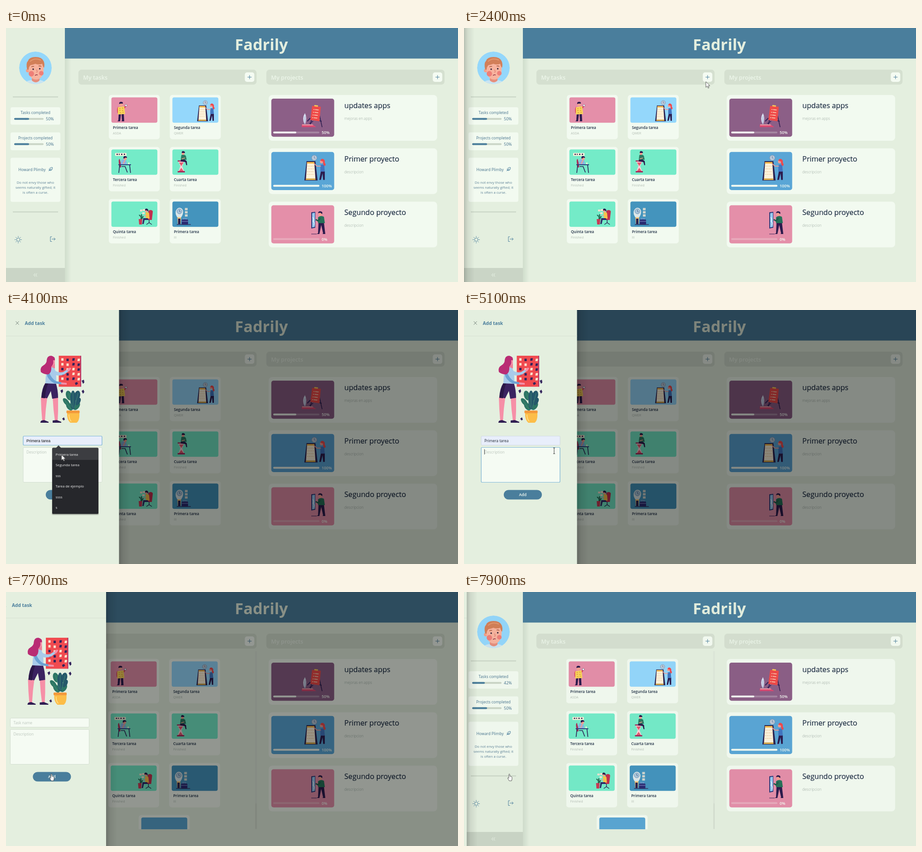
An HTML page that plays this animation: 998 px wide and 561 px high, repeating every 8000 ms.

```html
<!DOCTYPE html>
<html lang="es">
<head>
<meta charset="utf-8">
<title>Task board</title>
<style>
html,body{margin:0;width:100%;height:100%;overflow:hidden;background:#e4efdf}
svg{display:block;width:100vw;height:100vh}
text{font-family:"Open Sans","Noto Sans",sans-serif;white-space:pre}
.mid{text-anchor:middle}
.brand{font-size:34.3px;font-weight:700;fill:#e4efdf}
.bar{font-size:12.7px;font-weight:600;fill:#edf6ea}
.name{font-size:8.4px;font-weight:600;fill:#1f2f45}
.sub{font-size:7.2px;fill:#b3bdb3}
.big{font-size:16.15px;font-weight:500;fill:#1f2f45;stroke:#1f2f45;stroke-width:.2}
.note{font-size:8.2px;font-weight:300;fill:#98a59c}
.pct{font-size:8.7px;font-weight:600;fill:#f4fbf2}
.side{font-size:8.5px;font-weight:500;fill:#44718c}
.num{font-size:9px;font-weight:500;fill:#44718c}
.quote{font-size:7.7px;fill:#5d8196}
.head{font-size:10.2px;font-weight:700;fill:#4a7e9c}
.hint{font-size:8.4px;fill:#bcc6bd}
.value{font-size:8.4px;fill:#1c2430}
.pre{font:8.75px "Liberation Sans",Arial,sans-serif;fill:#111}
.menu{font-size:7.8px;fill:#f2f2f2}
.thin{fill:none;stroke:#4a7e9c;stroke-width:1}
.field{fill:#f5fbf3;stroke:#d3ddd0;stroke-width:1}
.focus{fill:none;stroke:#7fb8da;stroke-width:1.2}
#drawer,#mask,#list,.cur{animation:8s linear infinite}
#drawer{animation-name:slide}
#mask{animation-name:dim}
#list{animation-name:nudge;animation-timing-function:step-end}
#arrow{animation-name:arrow}
#beam{animation-name:beam}
#hand{animation-name:hand}
@keyframes slide{
 0%{transform:translateX(-250px);animation-timing-function:step-end}
 31.1%{transform:none;animation-timing-function:step-end}
 95.41%{transform:none;animation-timing-function:cubic-bezier(.7,.3,.1,1)}
 99.9%,100%{transform:translateX(-250px)}}
@keyframes dim{
 0%{opacity:0;animation-timing-function:step-end}
 31.1%{opacity:1;animation-timing-function:step-end}
 95.41%{opacity:1;animation-timing-function:cubic-bezier(.7,.3,.1,1)}
 99.9%,100%{opacity:0}}
@keyframes nudge{0%{transform:none}94.85%,100%{transform:translateX(-1.5px)}}
@keyframes arrow{
 0%,26%{transform:translate(560px,190px)}
 29%,30.2%{transform:translate(534px,118.5px)}
 31.1%,31.4%{transform:translate(473px,170px)}
 35.6%{transform:translate(200px,310px)}
 35.7%,48.7%{transform:translate(136px,300px)}
 51%,100%{transform:translate(122.5px,319.5px)}}
@keyframes beam{
 0%,35.6%{transform:translate(200px,312px)}
 36.2%{transform:translate(170px,337px)}
 38.7%,53.6%{transform:translate(138px,296px)}
 53.7%{transform:translate(125px,325px)}
 58.7%,100%{transform:translate(199px,311px)}}
@keyframes hand{
 0%,88.7%{transform:translate(148px,398px)}
 91.2%{transform:translate(104px,398px)}
 93.7%,100%{transform:translate(96px,402px)}}
</style>
</head>
<body>
<svg viewBox="0 0 998 561" preserveAspectRatio="none">
<defs>
<linearGradient id="edge"><stop stop-color="#000" stop-opacity=".2"/><stop offset=".35" stop-color="#000" stop-opacity=".08"/><stop offset="1" stop-color="#000" stop-opacity="0"/></linearGradient>
<linearGradient id="soft"><stop stop-color="#4a6a50" stop-opacity=".13"/><stop offset="1" stop-color="#4a6a50" stop-opacity="0"/></linearGradient>
<clipPath id="face"><circle cx="65" cy="88" r="36"/></clipPath>
<clipPath id="view"><rect x="160" y="131" width="394" height="392.5"/></clipPath>

<g id="planner">
 <path d="M249 188l-1 16-2 2h6l2-18zM255 188l1 16-1 2h6l-1-18z" fill="#2c1b4d"/>
 <path d="M247 174q-3 5-1 14l3 0v-13zM262 178l5-7-2-1-5 5z" fill="#d9435f"/>
 <path d="M247 175l14-2 2 17-16 1z" fill="#fad35b"/>
 <path d="M250 178l3 0M256 177l3 0M250 182h3M256 182h3M251 187h3M257 186h3" stroke="#d89a3c" stroke-width="1.4"/>
 <circle cx="254" cy="169" r="4" fill="#f5a08f"/>
 <path d="M250 168q-1-5 4-5 5 0 4 4l-5 0z" fill="#2c1b4d"/>
 <circle cx="265" cy="171" r="2.2" fill="#fff" stroke="#4a3b60" stroke-width=".6"/>
</g>

<g id="chart">
 <circle cx="440" cy="165" r="4.8" fill="#b9c9da" stroke="#7f93ad" stroke-width=".8"/>
 <path d="M440 162v3l2 1" fill="none" stroke="#44507a" stroke-width=".6"/>
 <path d="M426 171h16l4 35h-24z" fill="#2c2350"/>
 <path d="M427 172.500h13l2 30h-17z" fill="#fdf3dc"/>
 <path d="M427 172.500h13l.3 3h-13.600z" fill="#f6b94a"/>
 <path d="M428 180h11M428 185h11.500M427 190h13M427 195h13" stroke="#e3b98a" stroke-width="1" stroke-dasharray="1.6 1.6"/>
 <path d="M425 202.500h17l.3 2.500h-18z" fill="#f3c04c"/>
 <path d="M452 189l-3 16h3l3-12 1 12h3l0-16z" fill="#2c1b4d"/>
 <path d="M451 178q4-2 7 0l1 12h-8z" fill="#4276c1"/>
 <path d="M452 180l-7 0-6-5" fill="none" stroke="#f59d92" stroke-width="1.5"/>
 <circle cx="453" cy="172" r="2.800" fill="#f59d92"/>
 <path d="M451 170q1-4 5-3 4 2 3 7 3 3 0 6-4-2-3-8z" fill="#f04a4d"/>
</g>

<g id="desk">
 <rect x="241" y="276" width="25" height="6.500" rx="1" fill="#f7f2da"/>
 <path d="M244 279h3M249 279h2M254 279h3M260 279h3" stroke="#2c1b4d" stroke-width="2.300"/>
 <path d="M249 297q-1-7 2-8l3 12v7h-4z" fill="#a83058"/>
 <path d="M255 291q7-4 11 3l1 8h-14z" fill="#8ab5e3"/>
 <path d="M259 300l4-9" stroke="#f5a08f" stroke-width="2"/>
 <circle cx="263" cy="288" r="3.500" fill="#f5a08f"/>
 <path d="M259 288q0-6 5-5 4 1 3 4-4-2-5 1z" fill="#2c1b4d"/>
 <path d="M248 301h28v2h-28z" fill="#2d3f7c"/>
 <path d="M251 303l-2 17M273 303l2 17M255 306h8l5 13" fill="none" stroke="#2d2658" stroke-width="1.700"/>
 <rect x="270" y="297" width="2.500" height="4" fill="#f7f2da"/>
</g>

<g id="glass">
 <path d="M380 294h14l-5 11 4 11h-12l4-11z" fill="#f7d3d8"/>
 <path d="M382 297h10l-5 8zM387 309l5 7h-10z" fill="#e45a70"/>
 <path d="M379 292.500h16v2.500h-16zM379 316h16v3h-16z" fill="#a32c5c"/>
 <path d="M386 291h9l4 3 1 9h-2l-2-7-10-1z" fill="#2c1b4d"/>
 <path d="M387 281q5-3 10 1l2 9h-13z" fill="#2c7a62"/>
 <path d="M395 287l-7 2" stroke="#f5a08f" stroke-width="1.500"/>
 <circle cx="391" cy="277" r="3.200" fill="#f5a08f"/>
 <path d="M388 276q0-5 4-4 4 1 3 4z" fill="#2c1b4d"/>
</g>

<g id="chair">
 <path d="M296 401h5v4h-5zM302 400h5v4h-5zM301 407h5v4h-5z" fill="#f8e3d0"/>
 <path d="M297 417q-5-3-3-5 3 1 4 4-1-5 2-5 1 2 0 7 2-4 4-2-1 3-3 6h-4z" fill="#246d55"/>
 <path d="M293 422h8l-1 12h-6z" fill="#c93a55"/>
 <path d="M314 405q1-3 6-3 5 1 4 5l-2 17h-11v-3h5z" fill="#c2304e"/>
 <path d="M316 424v7M310 434l6-4 6 4" fill="none" stroke="#2c1b4d" stroke-width="1.400"/>
 <path d="M308 408q4-3 8 1l1 12h-8z" fill="#f7c34a"/>
 <path d="M313 420h-10l-2 13h3l2-9h9z" fill="#2f2a68"/>
 <path d="M311 414l-7 1" stroke="#f5a08f" stroke-width="1.700"/>
 <circle cx="310" cy="404" r="3" fill="#f5a08f"/>
 <path d="M307 403q0-5 4-4 4 1 3 6l-3-2z" fill="#2c1b4d"/>
</g>

<g id="bulb">
 <path d="M378 418q-5-8-3-14 3-7 8-7 6 0 8 7 1 6-4 14z" fill="#dce8ea"/>
 <circle cx="383" cy="405" r="5.500" fill="#a9c6dc" stroke="#6e93b4"/>
 <path d="M383 401.500v3.500l2.500 1.500" fill="none" stroke="#2f3f6d" stroke-width=".8"/>
 <path d="M378.500 418h8l-1 15h-6z" fill="#f6c77c"/><path d="M380 421h5v12h-5z" fill="#2c2350"/>
 <path d="M395 397.500h6v5h-6zM395 404.500h6v5h-6zM395 411.500h6v5h-6z" fill="#cfd6d0"/>
 <rect x="388" y="423" width="14" height="11" rx="1.500" fill="#2b2c73"/>
 <path d="M392 423v-2.500h6v2.500M388 427h14" fill="none" stroke="#8a95d0" stroke-width="1.200"/>
 <path d="M377 434h31" stroke="#2c1b4d" stroke-width="1.200"/>
</g>

<g id="easel">
 <path d="M680 176l-9 43M688 174l10 45M683 203l14 3" stroke="#2c1b4d" stroke-width="1.500"/>
 <path d="M676 172l19 2-3 32-20-3z" fill="#ef4b49"/>
 <path d="M679 180l12 1M678 186l12 1M677 192l12 1M676 198l12 1" stroke="#fbd9bd" stroke-width="1.500" stroke-dasharray="2 1.400 8"/>
 <path d="M681 170l8 1-.5 3-8-1z" fill="#f9c658"/>
 <path d="M659 212q-6-13 1-24 5 9 1 24z" fill="#d7def0"/>
 <path d="M660 213v-18" stroke="#7a84b0" stroke-width=".7"/>
 <path d="M653 213h24l8 6h-32z" fill="#d84b73"/><path d="M654 213l22 0 3 2h-25z" fill="#f5a0a8"/>
 <path d="M665 206l7-7M670 211l8-5" stroke="#342158" stroke-width="2"/>
</g>

<g id="phone">
 <path d="M674 407l9-1v35l-9 2z" fill="#2e3a78"/><path d="M676 409l6-1v31l-6 1.500z" fill="#98c9ef"/>
 <path d="M677 418q4 4 1 9 5 4 2 8" fill="none" stroke="#e9f4fb" stroke-width="1.500"/>
 <path d="M690 430l-1 23-3 2h6l4-20 4 18-1 2h6l-3-25z" fill="#2c1b4d"/>
 <path d="M689 418q6-5 13-1l2 14h-15z" fill="#267158"/>
 <path d="M694 420l-5 6-5-3" fill="none" stroke="#1e5d4b" stroke-width="3"/>
 <circle cx="694" cy="411" r="4" fill="#f5a08f"/>
 <path d="M689 409q1-5 6-4 5 1 3 6l-4-3z" fill="#2c1b4d"/>
 <path d="M674 455h12" stroke="#342158"/>
</g>
</defs>

<rect width="998" height="561" fill="#e4efdf"/>
<rect x="130" y="67" width="14" height="494" fill="url(#soft)"/>
<rect x="130" width="868" height="67.500" fill="#4a7e9c"/>
<text class="brand mid" x="564" y="49">Fadrily</text>

<g clip-path="url(#face)">
 <circle cx="65" cy="88" r="36" fill="#94d7fb"/>
 <path d="M36 130q4-13 20-15h18q15 2 20 15z" fill="#c9e4f2"/>
 <path d="M57 106h17v10q-8 8-17 0z" fill="#e58f7d"/>
 <circle cx="48" cy="94" r="4" fill="#f0a08c"/>
 <path d="M49 83q2-12 17-13 17 0 17 16 1 14-4 21-5 7-12 7-9 0-14-8-4-8-4-23z" fill="#f7b39e"/>
 <path d="M47 92q-4-14 2-20 3-8 16-8 14 0 18 9 3 6 1 15-3-3-4-9-8 3-15 0-5 2-11 3-4 4-4 10z" fill="#d27f58"/>
 <path d="M53 74q10-9 24-3" fill="none" stroke="#e39a6f" stroke-width="2"/>
 <circle cx="56" cy="101" r="6" fill="#ee7f78"/><circle cx="78" cy="100" r="5" fill="#ee7f78"/>
 <circle cx="60" cy="91" r="1.700" fill="#33253a"/><circle cx="74.500" cy="90" r="1.700" fill="#33253a"/>
 <path d="M56 86q3-2 6-1M72 84q3-1 6 1" fill="none" stroke="#a75a3f" stroke-width="1.500"/>
 <path d="M67 92q4 5 0 6" fill="none" stroke="#dc7f70" stroke-width="1.300"/>
 <path d="M64 105q3-3 6-1" fill="none" stroke="#8e3444" stroke-width="1.500"/>
</g>
<path d="M15 152.300h100M15 406.300h100" stroke="#c8d3c4" stroke-width="2"/>
<g fill="#f2faf0"><rect x="10" y="175" width="110" height="38.500" rx="4"/><rect x="10" y="230.500" width="110" height="39.500" rx="4"/><rect x="10" y="286.500" width="110" height="97.500" rx="4"/></g>
<text class="side mid" x="65" y="189.500">Tasks completed</text>
<text class="side mid" x="65" y="245.500">Projects completed</text>
<g stroke-width="4" stroke-linecap="round"><path d="M20 200.700h61M20 256.500h61" stroke="#cad5c6"/><path d="M20 200.700h24M20 256.500h29" stroke="#4a7e9c"/><path d="M44 200.700h5" stroke="#4a7e9c" data-on="0-7600"/></g>
<text class="num" x="88" y="204" data-on="0-7600">50%</text>
<text class="num" x="88" y="204" data-on="7600-8000">42%</text>
<text class="num" x="88" y="260">50%</text>
<text class="side mid" x="57.500" y="315.500">Howard Plimby</text>
<path class="thin" d="M94 316l6-6M95.500 314.500q-1-4 2-5.500 2-1.500 5-1 .5 3-1 5-2 3-6 1.500zM97 313h4"/>
<g class="quote mid"><text x="65" y="344">Do not envy those who</text><text x="65" y="355">seems naturally gifted; it</text><text x="65" y="366">is often a curse.</text></g>
<g class="thin" stroke-linecap="round"><circle cx="27" cy="467.500" r="3.700"/><path d="M27 460v1.700M27 473.300v1.700M19.500 467.500h1.700M32.800 467.500h1.700M21.700 462.200l1.200 1.200M31.100 471.600l1.200 1.200M21.700 472.800l1.200-1.200M31.100 463.400l1.200-1.200"/><path d="M101 461h-3v10.500h3M101.500 466.200h7M106 463.500l2.700 2.700-2.700 2.700"/></g>
<rect y="530" width="130" height="31" fill="#cad5c6"/>
<path d="M64.500 542l-3 3.500 3 3.500M68.500 542l-3 3.500 3 3.500" fill="none" stroke="#e8f2e5" stroke-width="1.100"/>

<g id="bars"></g>
<g clip-path="url(#view)"><g id="list"></g></g>
<g data-on="7600-8000"><rect x="550.500" y="131" width="3" height="392.500" fill="#d3decf"/><rect x="550.500" y="131" width="3" height="336" rx="1" fill="#dfe9db"/></g>
<g id="projects"></g>

<rect id="mask" width="998" height="561" fill="#000" fill-opacity=".45"/>

<g id="drawer">
 <rect x="249.500" width="24" height="561" fill="url(#edge)" data-on="2400-8000"/>
 <rect width="249.500" height="561" fill="#e4efdf"/>
 <path d="M0 57.500h249.500" stroke="#d7e1d3"/>
 <path d="M21.500 25l7 7.500M28.500 25l-7 7.500" stroke="#65736c" stroke-width=".9"/>
 <text class="head" x="41.500" y="32.800">Add task</text>
 <rect x="116.500" y="101" width="48" height="68.500" fill="#f04b50"/><path d="M164.300 101h1.700v68.500h-1.700z" fill="#a92362"/>
 <g id="notes"></g>
 <path d="M77 193l14 1-3 24-2 27h-6l-2-26zM103 192l12 1 0 30-1 22h-6l-3-25z" fill="#f68fa7"/>
 <path d="M84 243l10 4v2H76q0-4 3-5zM112 243l10 4v2h-19v-5z" fill="#2f1d52"/>
 <path d="M87 161l23 0q5 16 5 33l-13 2-3-17-8 16-13-2q1-20 9-32z" fill="#3a2260"/>
 <path d="M88 161l5 1q-6 16-7 33l-8-1q2-20 10-33z" fill="#2a1746"/>
 <path d="M99 119l9-1 0 11-7 3z" fill="#ee7f98"/>
 <path d="M92 129q8-5 15 0 5 9 4 34l-24-1q0-20 5-33z" fill="#a9cbea"/>
 <path d="M104 131q11 9 22 6l13-8 2 4-12 9q-14 6-26-1z" fill="#a9cbea"/><path d="M134 133l7-6 3 2-5 7z" fill="#f68fa7"/>
 <path d="M95 137q5 14 15 20l18 4 0 4-21-3q-15-8-17-20z" fill="#6ca2d4"/><path d="M122 160l12 1v4l-12-1z" fill="#f68fa7"/>
 <path d="M95 106q8-4 13 3l0 9q-4 6-9 5-6-6-4-17z" fill="#f68fa7"/>
 <path d="M108 111q1-8-8-10-9 0-10 9 0 8-7 12-9 5-6 15 7 6 17 5 7-4 6-17 6-6 4-14z" fill="#b92c74"/>
 <g fill="#2d7564"><ellipse cx="139" cy="189" rx="6.500" ry="11" transform="rotate(-18 139 189)"/><ellipse cx="133" cy="203" rx="5" ry="10" transform="rotate(-40 133 203)"/><ellipse cx="140" cy="213" rx="6" ry="10" transform="rotate(-35 140 213)"/><ellipse cx="156" cy="212" rx="6" ry="10" transform="rotate(35 156 212)"/></g>
 <g fill="#25586a"><ellipse cx="148" cy="199" rx="6" ry="21"/><ellipse cx="157" cy="189" rx="6.500" ry="11" transform="rotate(15 157 189)"/><ellipse cx="159" cy="202" rx="5" ry="9" transform="rotate(30 159 202)"/></g>
 <path d="M130 200l14 20M138 184l8 30M148 182v38M159 184l-8 32" fill="none" stroke="#4c9678" stroke-width=".8"/>
 <path d="M135 227h27q1 17-6 22h-14q-8-7-7-22z" fill="#fcbd48"/><rect x="133.500" y="222" width="29" height="6" rx="1.500" fill="#f39a3d"/><path d="M139 231q0 10 5 15" fill="none" stroke="#ffdc82" stroke-width="2"/>
 <path d="M120 178l5-3 1 5-3 4zM167 156l5-2 1 6-3 3zM167 179l4-3 2 5-3 4zM124 240l4-3 2 5-3 2zM152 161l5-2 2 4-5 3z" fill="#33245c"/>

 <rect class="field" x="38" y="278.500" width="174" height="20" rx="2"/>
 <rect x="38" y="278.500" width="174" height="20" rx="2" fill="#e8eefb" stroke="#d3dbe6" data-on="4000-7600"/>
 <rect class="field" x="38" y="303.500" width="174" height="77" rx="2"/>
 <rect class="focus" x="38" y="278.500" width="174" height="20" rx="2" data-on="3300-4800"/>
 <rect class="focus" x="38" y="303.500" width="174" height="77" rx="2" data-on="4800-7500"/>
 <text class="hint" x="45" y="291.700" data-on="0-4000 7600-8000">Task name</text>
 <text class="pre" x="45" y="291.700" data-on="4000-4300">Primera tarea</text>
 <text class="value" x="45" y="291.700" data-on="4300-7600">Primera tarea</text>
 <text class="hint" x="45" y="316.700" data-on="0-5400 7600-8000">Description</text>
 <g id="typing"></g>
 <rect x="87.700" y="397.500" width="84.300" height="21" rx="10.500" fill="#4a7e9c"/>
 <text class="mid" x="129.800" y="411.300" font-size="8.700" font-weight="600" fill="#f4fbf2">Add</text>
</g>

<g id="popup" data-on="3500-4300">
 <rect x="101" y="305" width="104" height="148" rx="3" fill="#000" opacity=".18"/>
 <path d="M110 305l6-6 6 6z" fill="#3c3d41"/>
 <rect x="102" y="304.500" width="102" height="146" rx="2" fill="#26272b"/>
 <path d="M102 331v-24.500q0-2 2-2h98q2 0 2 2v24.500z" fill="#3c3d41"/>
</g>

<g data-on="2100-2850 3900-4300"><path id="arrow" class="cur" d="M0 0V12.500L3 9.800 5 14.300 7 13.400 5 9.200H9z" fill="#fff" stroke="#333" stroke-width=".8"/></g>
<g data-on="2850-3900 4300-5400"><path id="beam" class="cur" d="M-2-6.500h1.500l.5.700.5-.7H2M0-6V6M-2 6.500h1.500l.5-.7.5.7H2" fill="none" stroke="#222" stroke-width=".9"/></g>
<g data-on="7100-8000"><path id="hand" class="cur" d="M3 8V1.300Q3 0 4.100 0T5.200 1.300V5q1.500-.6 2 .5 1.400-.4 1.600.7Q10 6 10 7.500V11l-1 4H3.800L.5 9.500Q0 8 1.500 8.200L3 9.500z" fill="#fff" stroke="#333" stroke-width=".8"/></g>
</svg>

<script>
const LOOP = 8000;
const $ = id => document.getElementById(id);
const rect = (x, y, w, h, r, fill) =>
  `<rect x="${x}" y="${y}" width="${w}" height="${h}" rx="${r}" fill="${fill}"/>`;
const text = (cls, x, y, s, extra = '') => `<text class="${cls}" x="${x}" y="${y}" ${extra}>${s}</text>`;
const use = (id, tf = '') => id ? `<use href="#${id}" transform="${tf}"/>` : '';
const add = (id, html) => $(id).insertAdjacentHTML('beforeend', html);

const bar = (x, label) => rect(x, 92, 393.5, 33, 7, '#d5e0d0') + text('bar', x + 10.5, 113.6, label) +
  rect(x + 367.5, 98, 21, 21, 5, '#f4fbf2') + `<path class="thin" d="M${x + 373.5} 108.500h9M${x + 378} 104v9"/>`;
add('bars', bar(159.8, 'My tasks') + bar(574.8, 'My projects'));

const task = (x, y, color, art, name, sub) => rect(x, y, 112.5, 98, 6, '#f2faf0') +
  rect(x + 5.7, y + 5.5, 101.5, 56, 4, color) + use(art) +
  text('name', x + 9, y + 75, name) + text('sub', x + 9, y + 87.7, sub);
const mint = '#74ebc8';
add('list', [
  ['#e48fa9', 'planner', 'Primera tarea', 'ASDA'],
  ['#94d7fb', 'chart', 'Segunda tarea', 'QWER'],
  [mint, 'desk', 'Tercera tarea', 'Finished'],
  [mint, 'glass', 'Cuarta tarea', 'Finished'],
  [mint, 'chair', 'Quinta tarea', 'Finished'],
  ['#4494bd', 'bulb', 'Primera tarea', 'III']
].map((a, i) => task(227 + i % 2 * 134.7, 147.7 + (i >> 1) * 115, ...a)).join('') +
  `<g data-on="7600-8000">${task(294.5, 492.5, '#5aa6d2', '', '', '')}</g>`);

const project = (y, color, art, tf, name, sub, pct) => rect(580, y, 372, 101, 8, '#f2faf0') +
  rect(585.8, y + 8, 138.8, 84.3, 5, color) + use(art, tf) +
  rect(590, y + 80.8, 102, 4, 2, 'rgba(244,251,242,.25)') + rect(590, y + 80.8, 1.02 * pct, 4, 2, '#f4fbf2') +
  text('pct', 697, y + 86, pct + '%') + text('big', 747, y + 29.3, name) + text('note', 747, y + 55.3, sub);
add('projects',
  project(148, '#8c5f87', 'easel', '', 'updates apps', 'mejoras en apps', 50) +
  project(265.7, '#5aa6d6', 'chart', 'translate(143.900 85.500) scale(1.220)', 'Primer proyecto', 'descripcion', 100) +
  project(383.5, '#e48fa9', 'phone', '', 'Segundo proyecto', 'descripcion', 0));

// sticky notes on the red board
for (let i = 0; i < 20; i++) {
  const c = i % 4, r = i >> 2, lean = c > 1 ? 2 : 0;
  add('notes', `<path d="M${122 + c * 11.5 + lean} ${106.5 + r * 10.6 + c % 2}h5l${-lean / 2} 5.500h-5z" fill="${(i * 3 + r) % 4 < 2 ? '#fbe3cf' : '#33245c'}"/>`);
}

['Primera tarea', 'Segunda tarea', 'sss', 'Tarea de ejemplo', 'ssss', 's']
  .forEach((s, i) => add('popup', text('menu', 109.5, 322 + i * 23.4, s)));

// typed word with its caret
const caret = (x, on) => add('typing', `<path d="M${x} 307.500v11.500" stroke="#222" stroke-width=".9" data-on="${on}"/>`);
const keys = [5400, 5500, 5600, 5700, 5900, 6100, 6300, 7600];
caret(45.3, '4900-5400');
for (let i = 0; i < 7; i++) {
  add('typing', text('value', 45, 316.7, 'ejemplo'.slice(0, i + 1), `data-on="${keys[i]}-${keys[i + 1]}"`));
  const x = 45.3 + $('typing').lastElementChild.getComputedTextLength();
  caret(x, i < 6 ? `${keys[i]}-${keys[i + 1]}` : '6300-6800 7300-7500');
}

// show elements only within their time ranges
for (const el of document.querySelectorAll('[data-on]')) {
  const ranges = el.dataset.on.split(' ').map(r => r.split('-').map(Number));
  const isOn = ms => ranges.some(([from, to]) => ms >= from && ms < to);
  const times = [...new Set([0, ...ranges.flat(), LOOP])].sort((a, b) => a - b);
  el.animate(times.map(ms => ({
    visibility: isOn(Math.min(ms, LOOP - 1)) ? 'visible' : 'hidden',
    offset: ms % LOOP ? (ms - 10) / LOOP : ms / LOOP,
    easing: 'steps(1, end)'
  })), { duration: LOOP, iterations: Infinity });
}
</script>
</body>
</html>
```
